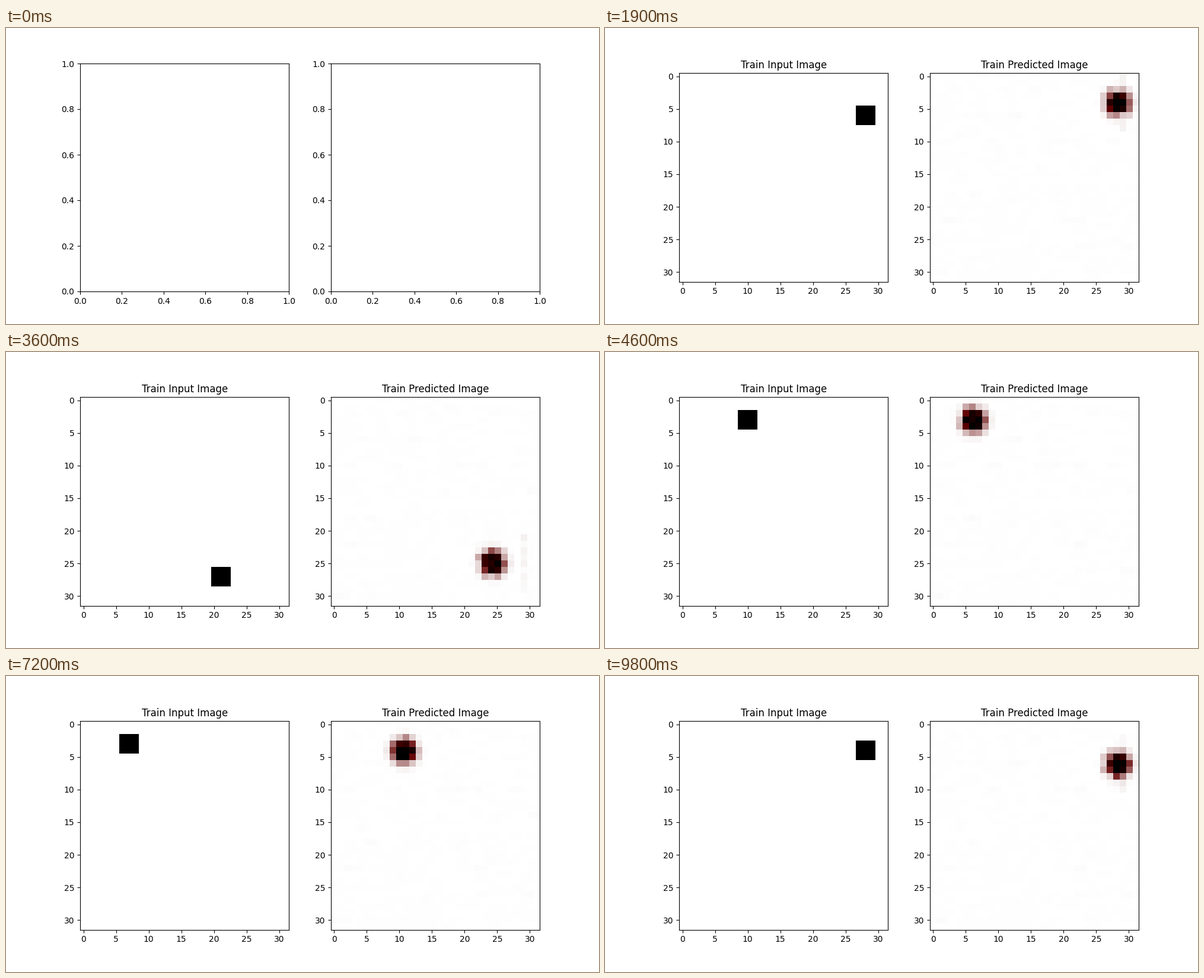
A matplotlib script that plays this animation: 1000 by 500 pixels, repeating every 9.9 s.

```python
import numpy as np
import matplotlib.pyplot as plt
from matplotlib.animation import FuncAnimation

plt.rcParams["font.family"] = "DejaVu Sans"

FRAMES, INTERVAL = 99, 100
SIZE = 32
ROWS, COLS = np.mgrid[0:SIZE, 0:SIZE]

fig, axes = plt.subplots(1, 2, figsize=(10, 5), dpi=100)


def path(n):
    """Lissajous path of the moving square, in grid cells."""
    x = 15.5 + 13 * np.cos(10 * np.pi * n / FRAMES + 0.008)
    y = 15.5 + 12.5 * np.sin(0.2535 * n - 0.79)
    return x, y


def cell(n):
    return tuple(int(np.floor(v + 0.5)) for v in path(n))


def input_image(n):
    x, y = cell(n)
    image = np.ones((SIZE, SIZE, 3))
    image[y - 1:y + 2, x - 1:x + 2] = 0
    return image


def make_texture():
    """Faint residue of the network, strongest on every fourth row."""
    rng = np.random.default_rng(7)
    texture = np.clip(rng.normal(-0.2, 0.6, (SIZE, SIZE)), 0, 1)
    texture = 0.5 * (texture + np.roll(texture, 1, axis=1))
    return texture * np.where(ROWS % 4 == 2, 1.0, 0.4)


TEXTURE = make_texture()


def predicted_image(n):
    rng = np.random.default_rng(1000 + n)
    x, y = path(n + 1)
    cx, cy = cell(n + 1)
    dist = np.hypot(COLS - cx - 0.6 * (x - cx), ROWS - cy - 0.6 * (y - cy))

    # Black core, dark red corners, pink rim
    red = np.interp(dist, [0.6, 1.0, 1.41, 2.0, 2.24, 2.83, 3.4],
                    [0, 0.05, 0.24, 0.71, 0.83, 0.97, 1])
    red += rng.normal(0, 0.06, red.shape) * (dist < 2.6)
    red = np.clip(red, 0, 1)
    other = np.clip((red - 0.38) / 0.62, 0, 1)

    # Stray cells in one column beside the blob
    if cx > 19:
        stray = (COLS == 29) & (np.abs(ROWS - cy) < 5) & (dist > 2.9)
        level = 0.06 * stray * rng.random(red.shape)
        red, other = red - 0.7 * level, other - level

    residue = 0.02 * TEXTURE * rng.uniform(0.3, 1, red.shape) * (dist > 3)
    red, other = red - 0.7 * residue, other - residue
    return np.clip(np.dstack([red, other, other]), 0, 1)


def show(ax, image, title):
    ax.imshow(image, interpolation="nearest")
    ax.set_title(title)
    ax.set_xticks(range(0, SIZE, 5))
    ax.set_yticks(range(0, SIZE, 5))


def update(n):
    for ax in axes:
        ax.clear()
        ax.set_aspect("auto")
    if n == 0:
        for ax in axes:
            ax.set(xlim=(0, 1), ylim=(0, 1))
        return
    show(axes[0], input_image(n), "Train Input Image")
    show(axes[1], predicted_image(n), "Train Predicted Image")


anim = FuncAnimation(fig, update, frames=FRAMES, interval=INTERVAL,
                     repeat=True, repeat_delay=0)
plt.show()
```
